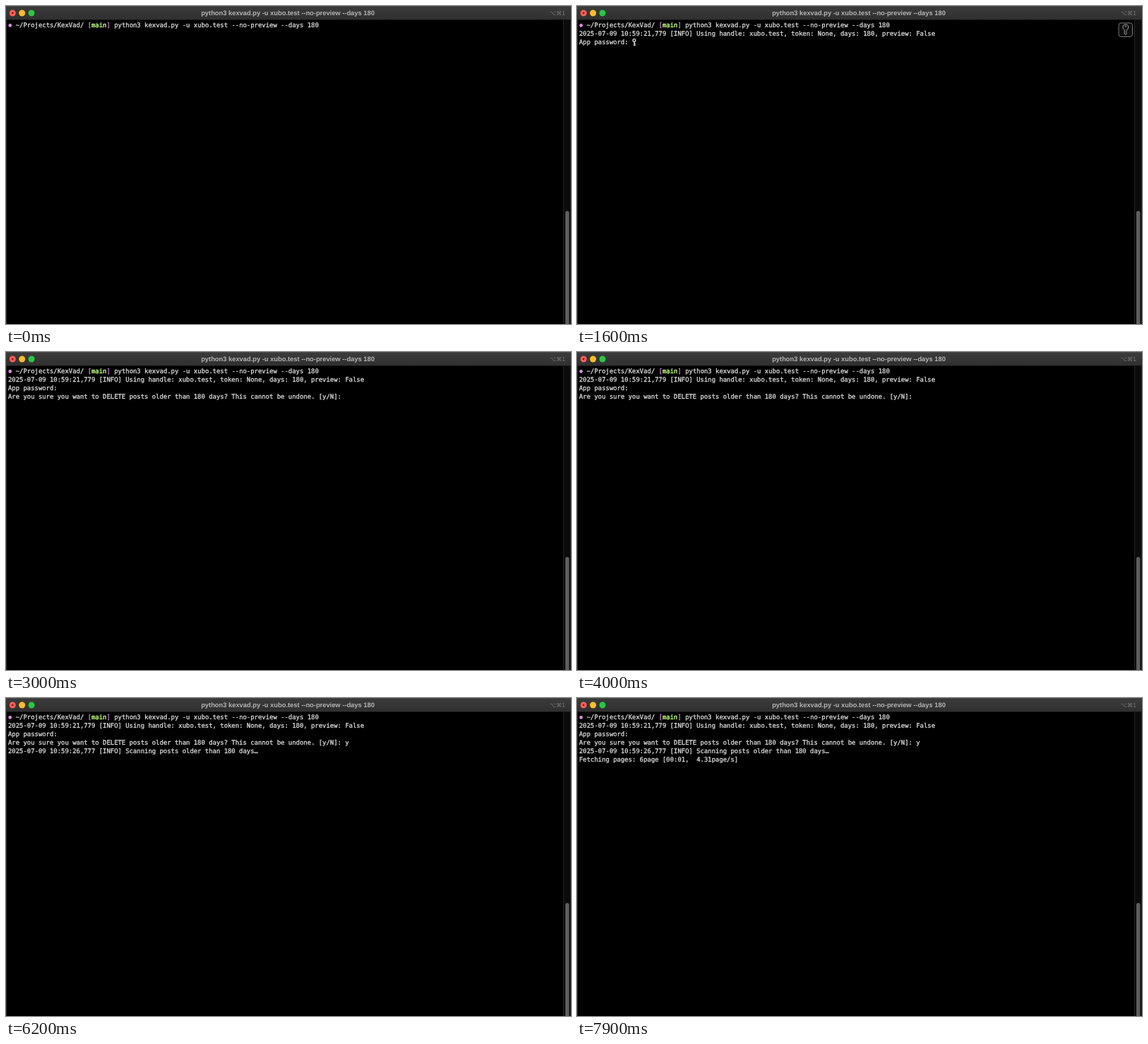
An HTML page for the animation above (8 s loop, 800x450 px).

```html
<!DOCTYPE html>
<html lang="en">
<head>
<meta charset="utf-8">
<title>Terminal session</title>
<style>
html, body { margin: 0; width: 100%; height: 100%; overflow: hidden; background: #000; }
svg { display: block; width: 800px; height: 450px; }
text { white-space: pre; text-rendering: geometricPrecision; }
.row { font: 8.92px "DejaVu Sans Mono", monospace; fill: #d8d8d8; stroke: #d8d8d8; stroke-width: .32px; }
.title { font: bold 9.34px "Liberation Sans", Arial, sans-serif; fill: #b4b4b4; text-anchor: middle; }
.hint { font: 8px "DejaVu Sans", sans-serif; fill: #777; text-anchor: end; }
.bracket { fill: #dd7fe6; stroke: #dd7fe6; }
.branch { fill: #b4f078; stroke: #b4f078; stroke-width: .5px; }
</style>
</head>
<body>
<svg viewBox="0 0 800 450">
  <defs>
    <linearGradient id="bar" x2="0" y2="1">
      <stop offset="0" stop-color="#3b3b3b"/>
      <stop offset="1" stop-color="#303030"/>
    </linearGradient>
  </defs>
  <rect width="800" height="450" fill="#000"/>

  <rect x="789" y="20" width="11" height="430" fill="#0b0b0b"/>
  <rect x="789" y="20" width="1" height="430" fill="#242424"/>
  <rect x="799" y="20" width="1" height="430" fill="#2a2a2a"/>
  <rect x="792" y="290" width="5.4" height="170" rx="2.7" fill="#5e5e5e"/>
  <rect y="19" width="1" height="431" fill="#333"/>

  <rect width="800" height="19.5" fill="url(#bar)"/>
  <rect width="800" height="1" fill="#4a4a4a"/>
  <circle cx="9.3" cy="10" r="4.5" fill="#ff5f57"/>
  <circle cx="9.3" cy="10" r="1.3" fill="#7d1510"/>
  <circle cx="22.7" cy="10" r="4.5" fill="#febc2e"/>
  <circle cx="36.1" cy="10" r="4.5" fill="#28c840"/>
  <text class="title" x="399" y="13" id="title"></text>
  <text class="hint" x="792" y="12.5">⌥⌘1</text>

  <circle cx="5.8" cy="27.5" r="2.4" fill="#dd86e4"/>
  <g id="rows"></g>

  <g id="cursor" fill="none" stroke="#e0e0e0" stroke-width="1.3">
    <circle cx="81" cy="48.6" r="1.9"/>
    <path d="M81 50.5V56.5M81 53.3h1.8M81 55.5h1.8"/>
  </g>

  <g id="badge" fill="none" stroke="#a0a0a0">
    <rect x="767" y="24" width="19.5" height="19.5" rx="3.5" fill="#0d0d0d" stroke="#777"/>
    <path d="M775.2 33.6a4 4 0 1 1 3.2 0v1.3l-1 1 1 1-1 1 1 1-1.6 1.9-1.6-1.6Z"
      stroke-linejoin="round"/>
    <circle cx="776.8" cy="28.6" r="1" stroke-width=".8"/>
  </g>
</svg>
<script>
const LOOP = 8000;
const LEFT = 3, CELL = 5.37, TOP = 30.2, LEADING = 12;
const handle = "xubo.test";
const command = `python3 kexvad.py -u ${handle} --no-preview --days 180`;
const question = "Are you sure you want to DELETE posts older than 180 days? This cannot be undone. [y/N]: ";

// Time at which each page count shows, and its rate
const pages = [
  [6300, "?"], [6600, " 4.02"], [6800, " 4.15"], [7000, " 4.19"],
  [7300, " 4.24"], [7500, " 4.28"], [7700, " 4.31"]
];

const $ = id => document.getElementById(id);

function addRow(line, col = 0) {
  const el = document.createElementNS("http://www.w3.org/2000/svg", "text");
  el.setAttribute("class", "row");
  el.setAttribute("x", LEFT + col * CELL);
  el.setAttribute("y", TOP + line * LEADING);
  $("rows").append(el);
  return el;
}

function setText(el, value) {
  if (el.textContent !== value) el.textContent = value;
}

function fetchLine(t) {
  const n = pages.filter(([at]) => t >= at).length - 1;
  if (n < 0) return "";
  const seconds = n > 4 ? "01" : "00";
  return `Fetching pages: ${n}page [00:${seconds}, ${pages[n][1]}page/s]`;
}

$("title").textContent = command;
addRow(0, 2).innerHTML = "~/Projects/KexVad/ <tspan class='bracket'>[</tspan>" +
  "<tspan class='branch'>main</tspan><tspan class='bracket'>]</tspan> " + command;

const output = [
  t => t >= 1000 ? `2025-07-09 10:59:21,779 [INFO] Using handle: ${handle}, token: None, days: 180, preview: False` : "",
  t => t >= 1000 ? "App password: " : "",
  t => t < 3000 ? "" : t < 4300 ? question : question + "y",
  t => t >= 6000 ? "2025-07-09 10:59:26,777 [INFO] Scanning posts older than 180 days…" : "",
  fetchLine
].map((say, i) => ({ say, el: addRow(i + 1) }));

function render(t) {
  for (const { say, el } of output) setText(el, say(t));
  const asking = t >= 1000 && t < 3000;
  $("cursor").setAttribute("opacity", asking ? 1 : 0);
  $("badge").setAttribute("opacity", asking ? Math.min(1, (t - 900) / 600) : 0);
}

const start = performance.now();
function tick() {
  render((performance.now() - start) % LOOP);
  requestAnimationFrame(tick);
}
tick();
</script>
</body>
</html>
```
